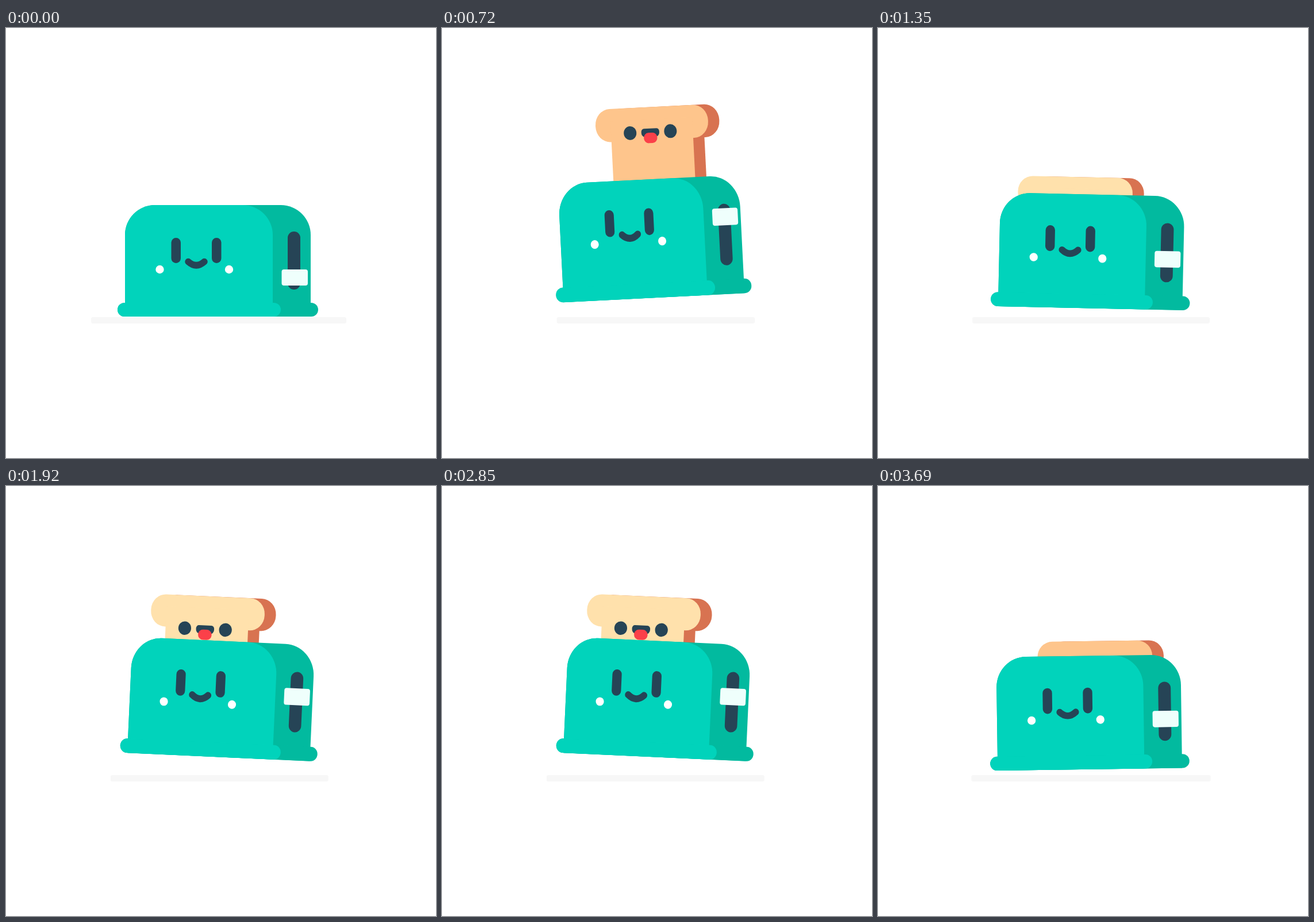
An HTML page with a canvas for the animation above (3720 ms loop, 748 by 748 pixels).

```html
<!DOCTYPE html>
<html lang="en">
<head>
<meta charset="utf-8">
<title>Hopping toaster</title>
<style>
html, body { margin: 0; width: 100%; height: 100%; overflow: hidden; background: #fff; }
canvas { display: block; width: 748px; height: 748px; }
</style>
</head>
<body>
<canvas id="stage" width="748" height="748"></canvas>
<script>
const ctx = document.getElementById('stage').getContext('2d');

const INK = '#264456', TEAL = '#01d3bb', TEAL_SIDE = '#02ba9f';
const CRUST = '#d87351', TONGUE = '#fb4049';
const CYCLE = 930, STEP = 30;
const CENTER = 368.5, GROUND = 502;

// Each hop pops its own slice and leans its own way.
const HOPS = [
  { start: 0, length: 450, lift: 47, tilt: 4, shift: 1.8, toastX: -22, bread: '#ffe1ac', faceY: 55 },
  { start: 450, length: 480, lift: 33, tilt: -2.9, shift: 0.5, toastX: 20, bread: '#fec58c', faceY: 41 }
];

function box(x, y, w, h, radii, color) {
  ctx.fillStyle = color;
  ctx.beginPath();
  ctx.roundRect(x, y, w, h, radii);
  ctx.fill();
}

function dot(x, y, r, color) {
  ctx.fillStyle = color;
  ctx.beginPath();
  ctx.arc(x, y, r, 0, Math.PI * 2);
  ctx.fill();
}

function bezier(a, b, s) {
  const r = 1 - s;
  return 3 * r * r * s * a + 3 * r * s * s * b + s * s * s;
}

// Fast take-off that slows down towards the top.
function easeUp(u) {
  let lo = 0, hi = 1;
  for (let i = 0; i < 24; i++) {
    const mid = (lo + hi) / 2;
    if (bezier(0.2, 0, mid) < u) lo = mid; else hi = mid;
  }
  return bezier(0.05, 1, lo);
}

function slice(x, color) {
  box(x - 109, 0, 201, 54, 26, color);
  box(x - 82, 20, 146, 130, 0, color);
}

function drawToast(hop, p) {
  ctx.save();
  ctx.translate(hop.toastX, -(183 + 130 * p));
  slice(20, CRUST);
  slice(0, hop.bread);
  ctx.translate(-12, hop.faceY);
  dot(-36, 0, 11.3, INK);
  dot(36, 0, 11.3, INK);
  box(-16, -6, 32, 14, [5, 5, 7, 7], INK);
  box(-12, 1, 24, 17, 11, TONGUE);
  ctx.restore();
}

function drawFace() {
  box(-81, -137, 16.5, 44, 8.2, INK);
  box(-10.5, -137, 16.5, 44, 8.2, INK);
  dot(-101, -82, 7.2, '#fff');
  dot(19.5, -82, 7.2, '#fff');
  ctx.strokeStyle = INK;
  ctx.lineWidth = 11.5;
  ctx.lineCap = 'round';
  ctx.beginPath();
  ctx.moveTo(-51.5, -95.5);
  ctx.quadraticCurveTo(-37.5, -83, -23.5, -95.5);
  ctx.stroke();
}

function drawToaster(p) {
  box(-161.5, -194, 323, 194, [52, 52, 0, 0], TEAL_SIDE);
  box(-174.5, -24, 349, 24, 12, TEAL_SIDE);
  box(-161.5, -194, 257, 194, [52, 52, 0, 0], TEAL);
  box(-174.5, -24, 284, 24, 12, TEAL);

  ctx.save();
  ctx.translate(0, -10 * p);
  drawFace();
  ctx.restore();

  box(121.5, -148, 22, 101, 11, INK);
  box(111, -82 - 59 * p, 45.5, 28, 4, '#effffc');
}

function draw(time) {
  const hop = time < HOPS[1].start ? HOPS[0] : HOPS[1];
  const u = (time - hop.start) / hop.length;
  const p = easeUp(1 - Math.abs(2 * u - 1));

  ctx.fillStyle = '#fff';
  ctx.fillRect(0, 0, 748, 748);

  const shadow = 444 - 100 * p;
  box(370 + 2 * p - shadow / 2, 503, shadow, 11, 3, '#f7f7f7');

  ctx.save();
  ctx.translate(CENTER + hop.shift * p, GROUND - hop.lift * p);
  ctx.rotate(hop.tilt * p * Math.PI / 180);
  ctx.scale(1 - 0.025 * p, 1 + 0.062 * p);
  if (p > 0.01) drawToast(hop, p);
  drawToaster(p);
  ctx.restore();
}

let begin;
function tick(now) {
  if (begin === undefined) begin = now;
  const time = (now - begin) % CYCLE;
  draw(Math.floor(time / STEP + 0.001) * STEP);
  requestAnimationFrame(tick);
}
draw(0);
requestAnimationFrame(tick);
</script>
</body>
</html>
```
